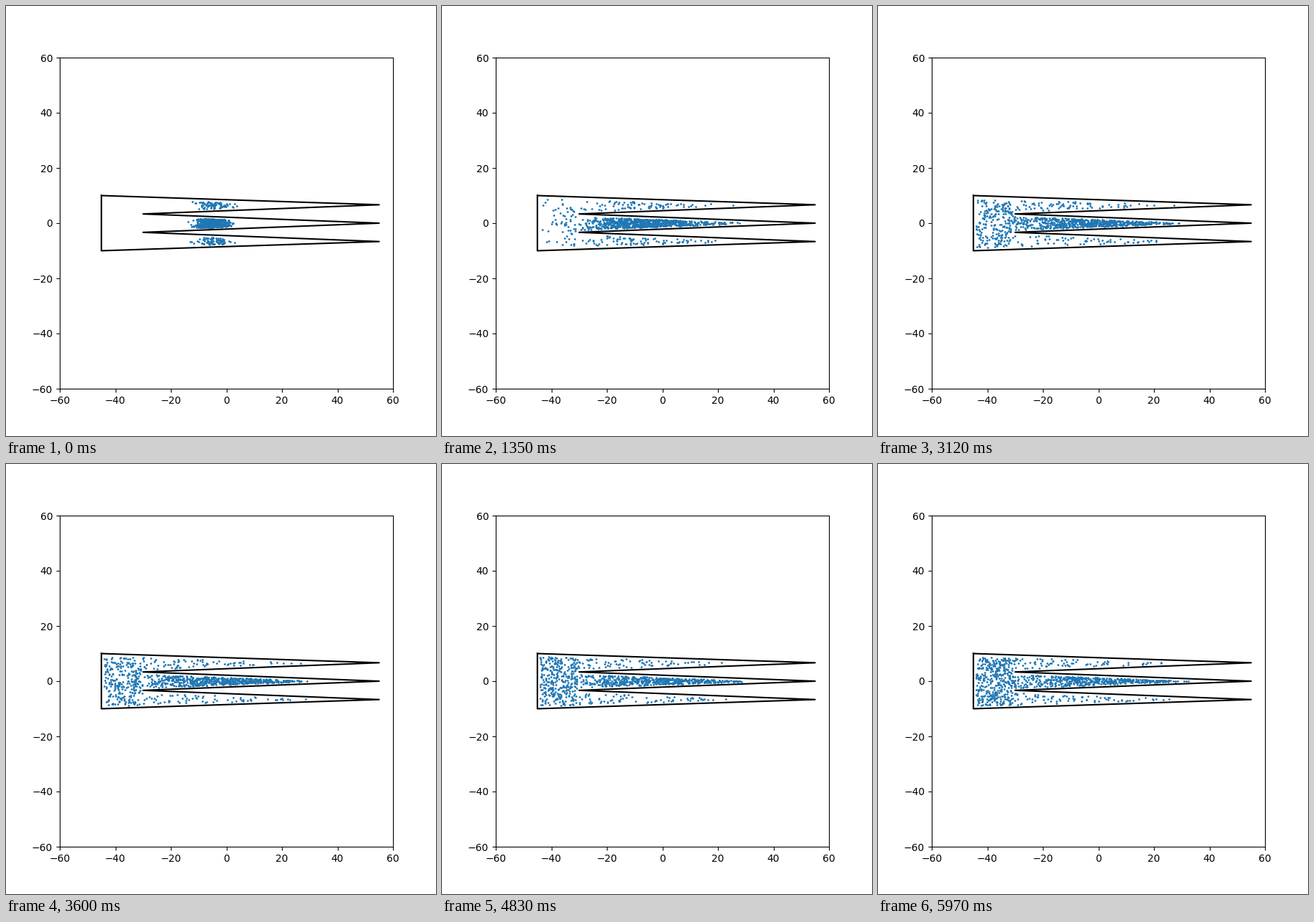
A matplotlib script for the animation above (6 s loop, 600 by 600 pixels).

```python
import numpy as np
import matplotlib.pyplot as plt
from matplotlib.animation import FuncAnimation

FRAMES, INTERVAL = 200, 30
SUBSTEPS, SPREAD = 8, 2.0      # random-walk spread per frame, in data units
MOUTH, ENTRY = -30.8, 0.3      # channel entrance, chance to walk back in
GAP = 0.88                     # distance kept from the walls
SLOPE = 10 / 3 / 85

rng = np.random.default_rng(7)


def bands(x):
    """Half-width of the middle channel, lower and upper edge of an outer one."""
    mid = (55 - x) * SLOPE - GAP
    low = 10 / 3 + (x + 30) * SLOPE + GAP
    top = 10 - (x + 45) / 30 - 0.95
    return mid, low, top


def inside(x, y):
    mid, low, top = bands(x)
    a = np.abs(y)
    free = (x < MOUTH) | (a < mid) | (a > low)
    return (x > -44) & (a < top) & free


def start(n_mid=830, n_side=85):
    x = np.concatenate([rng.normal(-4.8, 2.8, n_mid),
                        rng.normal(-5, 3.5, 2 * n_side)])
    mid, low, top = bands(x)
    u = rng.random(x.size)
    y = low + (top - low) * u
    y[n_mid + n_side:] *= -1
    y[:n_mid] = (mid * (2 * u - 1))[:n_mid]
    return x, y


def walk(x, y):
    sd = SPREAD / np.sqrt(SUBSTEPS)
    for _ in range(SUBSTEPS):
        nx = x + rng.normal(0, sd, x.size)
        entering = (x < MOUTH) & (nx >= MOUTH)
        ok = inside(nx, y) & (~entering | (rng.random(x.size) < ENTRY))
        x = np.where(ok, nx, x)
        ny = y + rng.normal(0, sd, y.size)
        y = np.where(inside(x, ny), ny, y)
    return x, y


states = [start()]
while len(states) < FRAMES:
    states.append(walk(*states[-1]))

fig, ax = plt.subplots(figsize=(6, 6), dpi=100)
ax.set_xlim(-60, 60)
ax.set_ylim(-60, 60)
ax.plot([-45, 55, -30, 55, -30, 55, -45, -45],
        np.array([30, 20, 10, 0, -10, -20, -30, 30]) / 3, "k", lw=1.5)
dots, = ax.plot([], [], "o", ms=1, color="C0")


def update(i):
    dots.set_data(*states[i])
    return dots,


anim = FuncAnimation(fig, update, frames=FRAMES, interval=INTERVAL,
                     repeat=True, repeat_delay=0)
plt.show()
```
